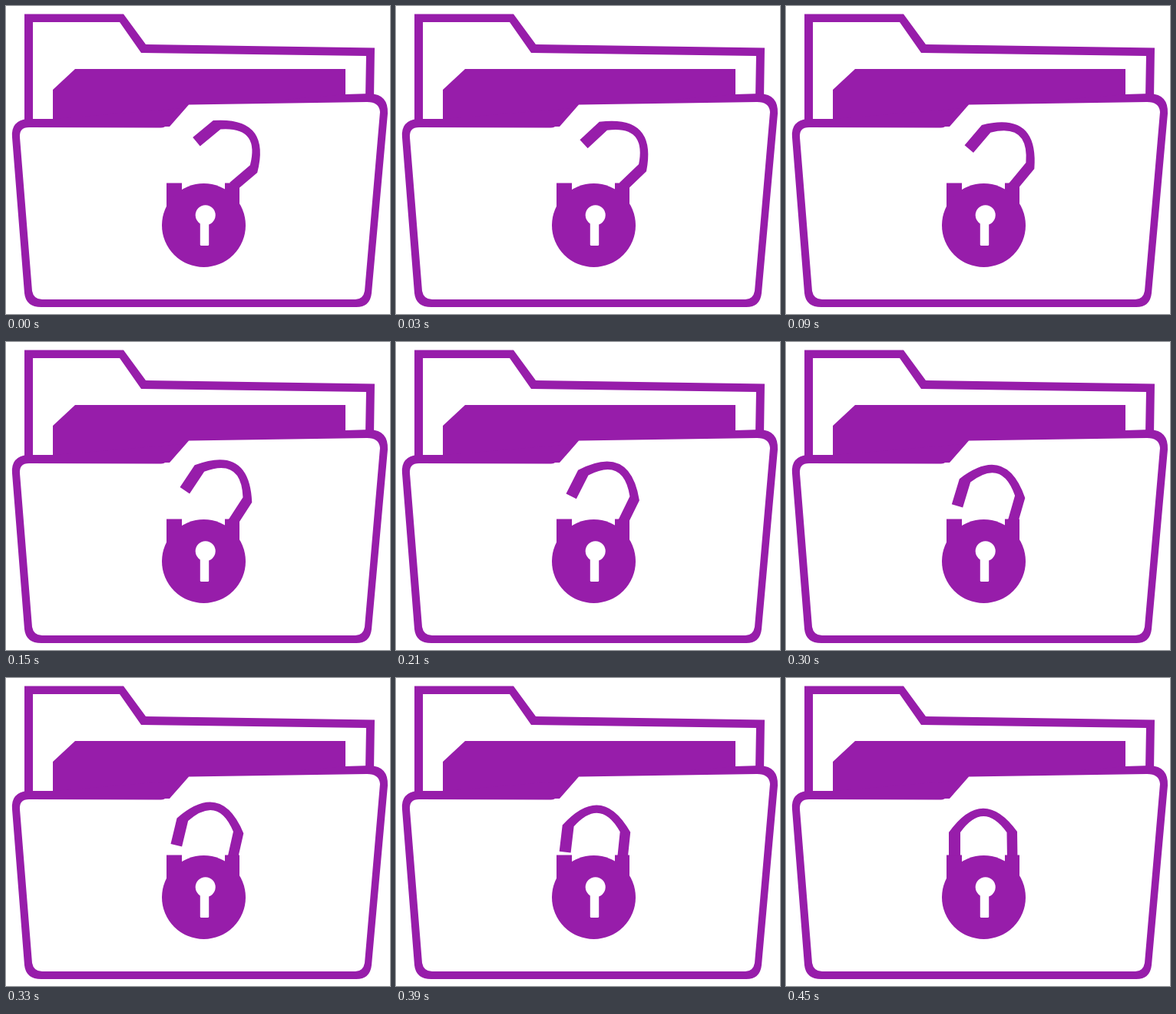
Write an HTML page that moves like this. It is 500 px wide and 401 px high and loops after 930 ms.

```html
<!DOCTYPE html>
<html lang="en">
<head>
<meta charset="utf-8">
<title>Folder lock</title>
<style>
  html, body { margin: 0; width: 100%; height: 100%; overflow: hidden; background: #fff; }
  svg { display: block; width: 500px; height: 401px; fill: #971daa; }
  .paper { fill: #fff; }
</style>
</head>
<body>
<svg viewBox="0 0 500 401">
  <!-- back cover and sheet -->
  <path d="M24 152V10.500H153L182 50 480 54.500 479 120H468L469 65 176 61 148 21H35V152Z"/>
  <path d="M61 152V109L90 82H442V122Z"/>
  <!-- front cover -->
  <path d="M8 171Q6 149 28 147H61L442 115 474 114Q498 115 497 140L476 374Q474 392 456 392H46Q26 392 24 374Z"/>
  <path class="paper" d="M18 171Q17 158 30 158L195 158.500Q205 159 207 157H213L238 128.500 470 125Q486 125 487 138L467 371Q465 382 455 382H47Q36 382 34 371Z"/>
  <!-- padlock -->
  <path id="shackle" d="M212 235.500V201Q256.500 139 301 200L301.500 236H288L287.500 201Q257 159 227 201V235.500Z"/>
  <path d="M209 230.500H229V265H209ZM285 230.500H304V265H285Z"/>
  <circle cx="257.500" cy="285.500" r="54.500"/>
  <g class="paper">
    <circle cx="259.700" cy="272.300" r="13"/>
    <rect x="252.800" y="278" width="11.400" height="34" rx="1.500"/>
  </g>
</svg>
<script>
  const LOOP = 930, STEP = 30, STEPS = 15, OPEN_ANGLE = 50.5;
  const shackle = document.getElementById('shackle');

  function draw() {
    const time = performance.now() % LOOP;
    const step = Math.min(STEPS, Math.floor(time / STEP));
    const angle = OPEN_ANGLE * (1 - step / STEPS);
    shackle.setAttribute('transform', `rotate(${angle} 296 236.3)`);
    requestAnimationFrame(draw);
  }
  draw();
</script>
</body>
</html>
```
